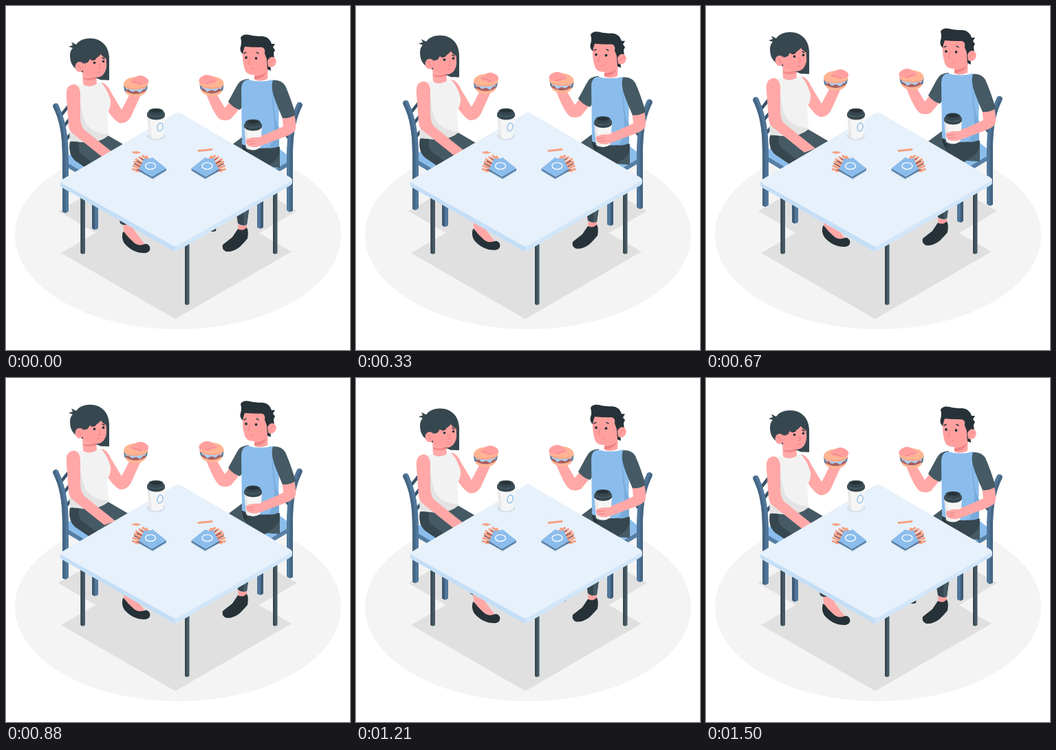
Write an HTML page that moves like this. It is 500 px wide and 500 px high and loops after 1.54 s.

```html
<!DOCTYPE html>
<html lang="en">
<head>
<meta charset="utf-8">
<title>Lunch for two</title>
<style>
html, body { margin: 0; width: 100%; height: 100%; overflow: hidden; background: #fff; }
svg { display: block; width: 100vw; height: 100vh; }
.skin { fill: #ffa8a7; }
.face { fill: #ffa09f; }
.ink { fill: #263238; }
.slate { fill: #37474f; }
.steel { fill: #455a64; }
.blue { fill: #8bbdec; }
.line { fill: none; stroke: #263238; stroke-width: 1.5; stroke-linecap: round; }
.soft { fill: none; stroke: #ee7f80; stroke-width: 1; stroke-linecap: round; }
</style>
</head>
<body>
<svg viewBox="0 0 500 500">
  <defs>
    <g id="chair">
      <path d="M80 159L92 144M84 175L96 160M87 195L98 181" stroke="#39536b" stroke-width="4.5"/>
      <path d="M83 224L104 207L150 235V264Z" class="blue"/>
      <path d="M83 224L150 264V271L83 231Z" fill="#557fa6"/>
      <path d="M125 270H134V323Q130 327 125 323Z" fill="#51779b"/>
      <path d="M125 270H129V325.500L125 323Z" fill="#3d5a76"/>
      <path d="M68.500 147C67 142 74 139 76.500 144C87 167 91 190 91 222V298Q87 303 82 299V222C82 190 79 168 68.500 147Z" fill="#51779b"/>
      <path d="M68.500 147Q67.500 143 71 142C82 166 86.500 190 86.500 222V301L82 299V222C82 190 79 168 68.500 147Z" fill="#456684"/>
    </g>
    <g id="cup">
      <path d="M205.500 160L208 190Q218 197 228.500 190L231 160Z" fill="#f5f5f5"/>
      <path d="M205.500 160L208 190Q210 192 212 192.500L209 163Z" fill="#e8e8e8"/>
      <path d="M205 156V160Q208 165 218 165.500Q229 165 231 160V156Z" class="slate"/>
      <ellipse cx="218" cy="156.500" rx="13" ry="5" class="steel"/>
      <path d="M207 153V157Q218 163 229 157V153Z" class="slate"/>
      <ellipse cx="218" cy="153" rx="11" ry="4.300" class="slate"/>
      <ellipse cx="218" cy="152.500" rx="8" ry="2.600" class="ink"/>
    </g>
    <g id="burger">
      <path d="M172 121Q174 131.500 188 132Q203 131 205 120Z" fill="#ffb593"/>
      <path d="M173 118L175 124Q188 132 202 124L205 116Z" fill="#a95f60"/>
      <path d="M171 115L173 122L178 121L183 125L189 123L195 126L200 121L205 121L206 113Z" fill="#a9cdf0"/>
      <path d="M171 115L172 123L175 125L174 118ZM203 117L202 124L205 121L206 114Z" fill="#5c7d9d"/>
      <path d="M171 115C170 107 181 103 190 103C201 103 208 108 206 115Q202 121.500 188 121.500Q173 121.500 171 115Z" fill="#ffb593"/>
      <path d="M173 118.500Q188 123 205 117" fill="none" stroke="#ee9a80"/>
      <path d="M180 108Q186 106 188 103Q196 99 202 103Q208 106 207 111Q203 115 197 114Q193 117 189 113Q182 114 180 108Z" class="face"/>
      <path d="M184 110Q191 111 197 114" class="soft"/>
    </g>
    <g id="fries">
      <path d="M193 240L213 253L234 239L210 230Z" fill="#d4e2ef"/>
      <path d="M184 232L197 237M186 226L200 233M188 222L202 231M193 219L205 229M198 217L208 226M203 218L210 226M183 237L197 240M188 240L200 239" stroke="#f6a184" stroke-width="3.200"/>
      <path d="M186 229L198 235M190 225L201 231M196 221L205 227M190 238L198 239" stroke="#8f4f50" stroke-width="1.500"/>
      <path d="M193 237L212 248L233 236V239L213 251L193 240Z" fill="#567fa6"/>
      <path d="M193 237Q197 231 201 221Q206 224 213 220L233 236L213 248Z" class="blue"/>
      <ellipse cx="210" cy="232.500" rx="7.500" ry="4.800" fill="none" stroke="#fff" stroke-width="1.300"/>
    </g>
  </defs>

  <ellipse cx="250" cy="333" rx="237" ry="137" fill="#f4f4f4"/>
  <path d="M80 359L248 262L415 357L246 455ZM76 298L130 267L190 302L136 333ZM423 298L364 332L310 302L369 267Z" fill="#e0e0e0"/>

  <g id="diners">
    <use href="#chair"/>
    <use href="#chair" transform="translate(499 -1.5) scale(-1 1)"/>

    <g id="woman">
      <path d="M138 111Q147 112 153 126L168 151L181 126L197 127L181 162Q174 172 165 170Q158 167 149 154Z" class="skin"/>
      <use href="#burger"/>
      <path d="M93 197Q90 216 101 225L126 242L190 232L184 209L148 188Z" class="steel"/>
      <path d="M93 197Q90 216 101 225L126 242L140 238L110 216Q104 210 106 198Z" class="slate"/>
      <path d="M160 290L166 316Q172 321 181 318L186 290Z" class="slate"/>
      <path d="M170 318L172 333L186 350L203 348L190 331L182 318Z" class="skin"/>
      <path d="M170 328Q167 337 172 345Q185 360 203 359Q211 357 209 350Q206 345 202 346Q192 350 185 343Q177 336 172 329Z" class="ink"/>
      <path d="M104 114Q120 116 138 111Q147 120 152 137Q153 147 147 156L149 188Q135 200 112 198L93 196L92 180L100 150Z" fill="#f2f2f2"/>
      <path d="M107 122Q108 150 114 166Q121 184 149 187V188Q135 200 112 198L93 196V176Z" fill="#e3e3e3"/>
      <path d="M97 114Q86 116 88 133L91 174Q92 182 98 186L143 222L159 216L114 180Q108 174 108 160V126Q106 113 97 114Z" class="skin"/>
      <path d="M111 94L112 114Q121 120 132 113L131 98Z" class="skin"/>
      <path d="M112 104Q122 107 131 102V106Q122 110 112 106Z" fill="#f18889"/>
      <path d="M91 59L97 57L95 52.500L102 56C106 50 114 47 122 47C140 47 150 60 150 76V107.500H138L108 95Q93 89 93 72Q93 65 97 61Z" class="slate"/>
      <path d="M112 79L122 65L146 70Q149 93 140 101Q134 106 125 103L112 99Z" class="face"/>
      <ellipse cx="107" cy="88.500" rx="6.500" ry="7.500" class="face"/>
      <path d="M104 86Q109 86 108 92" class="soft"/>
      <path d="M108 80Q112 80 113 84L119 82L122 77L124 79Q132 77 138 70Q141 75 147 77L146 60L120 53L102 64Z" class="slate"/>
      <path d="M144 65L150 75V107.500H145Q148 86 144 65Z" class="slate"/>
      <circle cx="128.500" cy="82.500" r="1.800" class="ink"/>
      <circle cx="141.500" cy="80.500" r="1.800" class="ink"/>
      <path d="M126 78.500L130 77M140 75.500L143 77" class="line"/>
      <path d="M136 84L137 91L134 91M133 97L137 96" class="soft"/>
    </g>

    <g id="man">
      <path d="M326 138L338 151L327 164Q320 168 312 165Q304 162 291 128L305 126L318 148Z" class="skin"/>
      <use href="#burger" transform="translate(487.500 -1) scale(-1 1)"/>
      <path d="M353 106Q340 106 335 117L323 139Q330 148 340 151L350 138Z" class="steel"/>
      <path d="M344 190L320 208L350 232L398 235V205Z" class="steel"/>
      <path d="M343 199Q360 209 397 204Q400 217 390 226L375 236L355 226Q344 215 343 199Z" class="slate"/>
      <path d="M343 200Q347 210 357 215L347 211L352 219Q344 213 343 200Z" class="ink"/>
      <path d="M333 290L337 316Q343 321 350 318L354 290Z" class="slate"/>
      <path d="M346 290H354L350 318L345 319Z" class="steel"/>
      <path d="M337 317L338 327Q344 330 350 325V318Q344 321 337 317Z" class="face"/>
      <path d="M337 324Q344 328 350 322Q353 327 351 338Q346 344 340 350Q330 358 320 357Q313 354 315 347L329 336Z" class="ink"/>
      <path d="M292 324L306 319L305 327Q299 329 294 327Z" class="ink"/>
      <path d="M352 107Q369 112 388 107L397 122L396 204Q370 211 343 201L342 122Q342 108 352 107Z" class="blue"/>
      <path d="M388 108Q386 125 389 140Q390 165 397 177V204Q390 207 382 207Q393 186 389 160Q385 130 388 108Z" fill="#78abdb"/>
      <path d="M401 157L419 158Q423 174 420 181Q417 186 403 191L365 205Q350 207 349 198Q350 192 359 191L376 187L403 175Z" class="skin"/>
      <path d="M388 108Q400 107 406 116Q414 134 421 158Q412 164 402 163Q397 152 392 139Q384 119 388 108Z" class="steel"/>
      <use href="#cup" transform="translate(141 16)"/>
      <path d="M351 193Q359 190 367 191L377 188L382 199L364 205Q352 206 349 199Q348 194 351 193Z" class="skin"/>
      <path d="M351 197L361 196M353 201L361 200" class="soft"/>
      <path d="M361 94V107Q369 111 380 106L381 88Z" class="face"/>
      <path d="M361 102Q371 102 378 96Q377 103 366 106L361 106Z" fill="#ee8182"/>
      <path d="M344 62Q343 80 347 92Q350 101 361 100Q374 99 380 91L384 72L377 57L350 55Z" class="face"/>
      <path d="M341 46Q344 40 354 42Q361 44 373 44Q383 45 386 55L391 55L388 60L391 64L389 68L390 77L384 83L385 94L380 92L379 77L376 69Q378 59 368 60Q356 60 347 59Q345 64 344 70Q339 65 341 59Q343 54 341 46Z" class="ink"/>
      <path d="M380 80Q384 72 390 75Q395 79 391 86Q387 91 381 88Z" class="face"/>
      <path d="M384 83Q386 78 390 79" class="soft"/>
      <circle cx="349" cy="75" r="1.900" class="ink"/>
      <circle cx="363.500" cy="76" r="1.900" class="ink"/>
      <path d="M346 69L349 67.500M364 67.500L367 69" class="line"/>
      <path d="M355 76L352 84L355 85M357 92L361 90" class="soft"/>
    </g>
  </g>

  <g id="table">
    <path d="M108.500 270H115V359Q112 362 108.500 359ZM388 268H394.500V359Q391 362 388 359ZM260 342H266.500V433Q263 436 260 433Z" class="steel"/>
    <path d="M108.500 270H111V360.500L108.500 359ZM388 268H390.500V360.500L388 359ZM260 342H262.500V434.500L260 433Z" class="slate"/>
    <path d="M79 255V260Q79 262 82 264L242 355.500Q246 357.500 250 355.500L413 261Q416 259 416 257V252Z" fill="#d2e6f9"/>
    <path d="M79 255V260Q79 262 82 264L242 355.500Q244 356.500 246 356.500V348Z" fill="#c4def6"/>
    <path d="M82 252L246 156Q250 153 254 156L413 249Q418 252 413 255L250 348Q246 350 242 348L82 258Q77 255 82 252Z" fill="#e7f1fb"/>
    <ellipse cx="218" cy="189" rx="13" ry="6" fill="#d2dde8"/>
    <use href="#cup"/>
    <ellipse cx="224" cy="176" rx="4" ry="6" transform="rotate(14 224 176)" fill="none" stroke="#8bbdec" stroke-width="1.300"/>
    <use href="#fries"/>
    <use href="#fries" transform="translate(502.500) scale(-1 1)"/>
    <path d="M182 212L190 211L197 213L190 215L185 214Z" fill="#f6a184"/>
    <path d="M280 210.500L299 208.500" stroke="#f6a184" stroke-width="3" stroke-linecap="round"/>
  </g>
</svg>
<script>
const LOOP = 1540, LEAD = 42, RISE = 9.2;
const diners = document.getElementById('diners');
const start = performance.now();

function draw(now) {
  const phase = 2 * Math.PI * (now - start + LEAD) / LOOP;
  const lift = RISE * (1 - Math.cos(phase)) / 2;
  diners.setAttribute('transform', `translate(0 ${-lift})`);
  requestAnimationFrame(draw);
}
draw(start);
</script>
</body>
</html>
```
